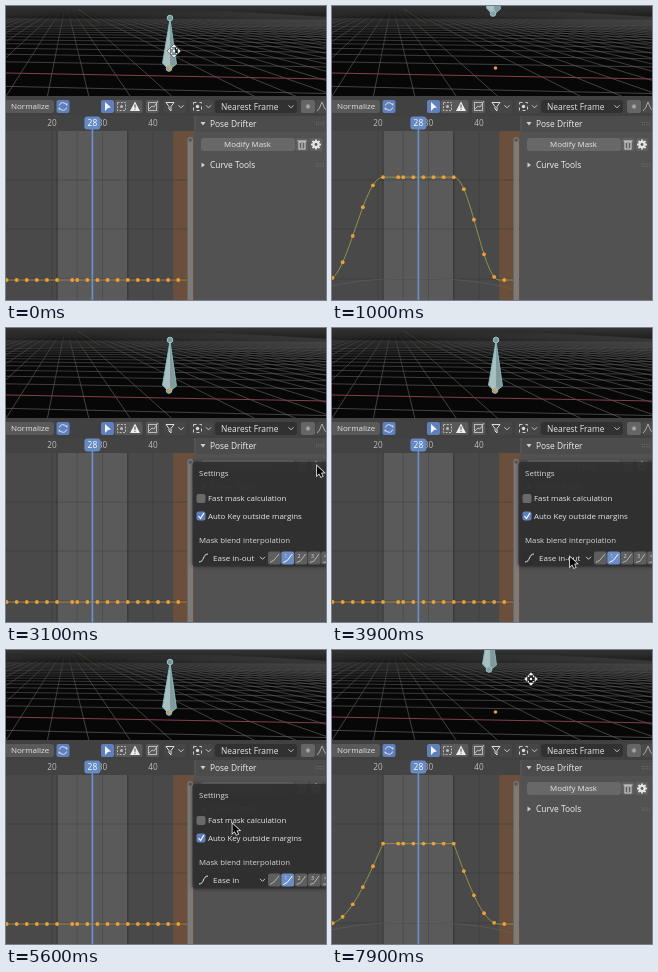
These frames come from a looping animation (320x294 px, 8000 ms). An HTML page with a canvas:

```html
<!DOCTYPE html>
<html lang="en">
<head>
<meta charset="utf-8">
<title>Offset mask</title>
<style>
html, body { margin: 0; width: 100%; height: 100%; overflow: hidden; background: #424242; }
canvas { display: block; width: 320px; height: 294px; }
</style>
</head>
<body>
<canvas id="stage"></canvas>
<script>
const W = 320, H = 294, LOOP = 8000, STEP = 100;
const BASE = 274, GAIN = 1.87;
const BLUE = '#5f80bc', TEXT = '#e6e6e6', ORANGE = '#eda035';
const canvas = document.getElementById('stage');
const g = canvas.getContext('2d');
const dpr = window.devicePixelRatio || 1;
canvas.width = W * dpr;
canvas.height = H * dpr;

const frameX = f => 46 + (f - 20) * 5.05;
const keys = [11, 13, 15, 17, 19, 21, 24, 25, 27, 29, 31, 33, 35, 37, 39, 41, 43, 45];

// Tracks are lists of [time, x, y], joined by straight moves.
const firstDrag = [[0, 0, 0], [500, -1, -27], [1000, -2, -55], [1300, -2, -60]];
const secondDrag = [[7000, 0, 0], [7400, -3, -19], [7900, -6, -43]];
const pointer = [
  [1700, 168, 8], [2000, 250, 78], [2100, 250, 78], [2200, 272, 94], [2900, 311, 138],
  [3100, 311, 138], [3900, 238, 229], [4000, 238, 231], [4200, 240, 237],
  [4300, 240, 237], [4600, 242.5, 246], [4800, 241, 246], [5300, 240, 245],
  [5700, 222, 150], [6100, 205, 72]
];

function along(track, t) {
  if (t <= track[0][0]) return track[0].slice(1);
  for (let i = 1; i < track.length; i++) {
    const [t0, x0, y0] = track[i - 1], [t1, x1, y1] = track[i];
    if (t <= t1) {
      const k = (t - t0) / (t1 - t0);
      return [x0 + (x1 - x0) * k, y0 + (y1 - y0) * k];
    }
  }
  return track[track.length - 1].slice(1);
}

function rect(x, y, w, h, fill, r = 0) {
  g.fillStyle = fill;
  g.beginPath();
  g.roundRect(x, y, w, h, r);
  g.fill();
}

function line(points, color, width = 1) {
  g.strokeStyle = color;
  g.lineWidth = width;
  g.beginPath();
  points.forEach(([x, y], i) => i ? g.lineTo(x, y) : g.moveTo(x, y));
  g.stroke();
}

function poly(points, fill) {
  g.fillStyle = fill;
  g.beginPath();
  points.forEach(([x, y]) => g.lineTo(x, y));
  g.fill();
}

function dot(x, y, r, fill, stroke) {
  g.beginPath();
  g.arc(x, y, r, 0, Math.PI * 2);
  g.fillStyle = fill;
  g.fill();
  if (stroke) {
    g.strokeStyle = stroke;
    g.lineWidth = 1;
    g.stroke();
  }
}

function label(str, x, y, size = 8, color = TEXT, align = 'left') {
  g.font = `${size}px "Open Sans", "Noto Sans", sans-serif`;
  g.textAlign = align;
  g.textBaseline = 'alphabetic';
  g.fillStyle = color;
  g.fillText(str, x, y + size * 0.36);
}

function chevron(x, y) {
  line([[x - 2.5, y - 1.2], [x, y + 1.3], [x + 2.5, y - 1.2]], '#c8c8c8');
}

function easeIcon(x, y, color = TEXT) {
  g.strokeStyle = color;
  g.lineWidth = 1;
  g.beginPath();
  g.moveTo(x - 4.5, y + 4);
  g.bezierCurveTo(x + 1, y + 4, x - 1, y - 4, x + 4.5, y - 4);
  g.stroke();
}

function drawGrid() {
  rect(0, 0, W, 91, '#070707');
  g.save();
  g.beginPath();
  g.rect(0, 0, W, 91);
  g.clip();
  const haze = g.createLinearGradient(0, 0, 0, 24);
  haze.addColorStop(0, '#343434');
  haze.addColorStop(0.4, '#202020');
  haze.addColorStop(1, 'rgba(7,7,7,0)');
  rect(0, 0, W, 24, haze);
  const fade = g.createLinearGradient(0, 4, 0, 70);
  fade.addColorStop(0, 'rgba(90,90,90,0)');
  fade.addColorStop(0.25, 'rgba(95,95,95,.6)');
  fade.addColorStop(1, 'rgba(100,100,100,.8)');
  const vx = 60, vy = -4;
  for (let n = -36; n <= 36; n++) {
    if (n === 0) continue;
    const end = 163 + n * 29;
    line([[vx, vy], [vx + (end - vx) * 1.6, vy + 66 * 1.6]], fade, 0.8);
  }
  for (let n = -1; n < 20; n++) {
    if (n === 0) continue;
    const y = vy + 73 / (1 + n * 0.17), tilt = 3 * (y - vy) / 73;
    line([[0, y - tilt], [W, y + tilt]], fade, 0.8);
  }
  line([[vx + 12, 3], [vx + 34, 17.5]], 'rgba(80,110,50,.5)', 0.8);
  line([[0, 67], [W, 73]], '#80404a', 1);
  g.restore();
}

function drawBone(dx, dy) {
  g.save();
  g.beginPath();
  g.rect(0, 0, W, 91);
  g.clip();
  g.translate(dx, dy);
  const tip = [164, 13], low = [163, 64], left = [156.5, 57], right = [170.5, 58], mid = [164.5, 60];
  poly([tip, left, low, mid], '#a9bfc0');
  poly([tip, right, low, mid], '#839a9c');
  line([tip, left, low, right, tip], '#7fc0c6', 0.9);
  line([tip, mid], '#9bb5b6', 0.6);
  dot(164, 12, 2.8, '#7d9496', '#8fc9ce');
  dot(163, 62.5, 2.8, '#8ba0a2', '#8fc9ce');
  g.restore();
  dot(163.5, 62, 1.8, '#eb9648');
}

function drawHeader() {
  rect(0, 90, W, 20, '#414141');
  rect(-5, 94, 53, 13, '#595959', 3);
  label('Normalize', 5, 100.5);
  rect(50.5, 94, 13, 13, BLUE, 2);
  g.strokeStyle = '#dde4f0';
  g.lineWidth = 1;
  for (const a of [0.3, 3.44]) {
    g.beginPath();
    g.arc(57, 100.5, 3.7, a, a + 2.3);
    g.stroke();
  }
  poly([[59, 97.5], [61.5, 97.5], [61.2, 100]], '#dde4f0');
  poly([[55, 103.5], [52.5, 103.5], [52.8, 101]], '#dde4f0');

  rect(95, 94, 13, 13, BLUE, 2);
  poly([[99, 96], [105, 101.5], [102, 102], [99, 105]], '#f2f2f2');
  rect(108.5, 94, 28, 13, '#595959', 2);
  g.setLineDash([2, 1.3]);
  g.strokeStyle = '#bbb';
  g.strokeRect(111.5, 96.5, 8, 8);
  g.setLineDash([]);
  dot(115.5, 100.5, 1.5, '#bbb');
  poly([[129, 95.5], [134, 105], [124, 105]], '#eeeeee');
  rect(128.5, 98.5, 1, 3.3, '#444');
  rect(128.5, 102.8, 1, 1, '#444');
  rect(140, 94, 13, 13, '#595959', 2);
  g.strokeStyle = '#bbb';
  g.strokeRect(142.5, 96.5, 8, 8);
  line([[143, 103], [146, 100], [148, 101], [152, 95]], '#bbb');
  rect(158, 94, 22, 13, '#464646', 2);
  g.strokeStyle = '#ddd';
  g.beginPath();
  g.moveTo(160, 96.5);
  g.lineTo(168, 96.5);
  g.lineTo(165, 100.5);
  g.lineTo(165, 105);
  g.lineTo(163, 103);
  g.lineTo(163, 100.5);
  g.closePath();
  g.stroke();
  chevron(175, 100.5);
  rect(184, 94, 23, 13, '#464646', 2);
  g.setLineDash([3, 3]);
  g.strokeStyle = '#ccc';
  g.strokeRect(187.5, 96.5, 8, 8);
  g.setLineDash([]);
  dot(191.5, 100.5, 1.7, '#ddd');
  chevron(202.5, 100.5);
  rect(209, 94, 82, 13, '#313131', 3);
  label('Nearest Frame', 215, 100.5, 8.4);
  chevron(285, 100.5);
  rect(295, 94, 14, 13, '#656565', 2);
  dot(302, 100.5, 2, '#aaa', '#888');
  rect(309.5, 94, 12, 13, '#4a4a4a', 2);
  line([[311, 105], [313.5, 102], [316, 96], [318.5, 102], [321, 105]], '#aaa');
}

function mask(f, ease) {
  const t = f < 21 ? (f - 10) / 11 : f > 35 ? (44 - f) / 9 : 1;
  return ease(Math.max(0, Math.min(1, t)));
}
const easeInOut = t => (1 - Math.cos(Math.PI * t)) / 2;
const easeIn = t => 1 - Math.cos(Math.PI * t / 2);

function drawGraph(dy, ease) {
  rect(0, 109, 188, 185, '#494949');
  const a = frameX(21), b = frameX(35);
  rect(a, 125, b - a, 169, '#5a5a5a');
  rect(frameX(44), 125, 21, 169, '#694f3c');
  for (const f of [20, 25, 30, 35, 40]) line([[frameX(f), 125], [frameX(f), H]], 'rgba(45,45,45,.25)');
  for (const y of [174, 223, 273]) line([[0, y], [188, y]], 'rgba(45,45,45,.3)');
  line([[a, 125], [a, H]], '#363636');
  line([[b, 125], [b, H]], '#363636');
  rect(0, 109, 188, 16, '#434343');
  for (const f of [20, 30, 40]) label(String(f), frameX(f), 117, 8.2, '#bdbdbd', 'center');

  const valueY = f => BASE + dy * GAIN * mask(f, ease);
  if (dy) {
    g.strokeStyle = 'rgba(115,105,100,.55)';
    g.lineWidth = 0.8;
    g.beginPath();
    g.moveTo(0, 280);
    g.bezierCurveTo(45, 269, 130, 269, 181, 283);
    g.stroke();
  }
  const curve = [];
  for (let f = 10; f <= 46.8; f += 0.25) curve.push([frameX(f), valueY(f)]);
  line(curve, dy ? '#93934c' : '#a8813e', 1);
  for (const f of keys) dot(frameX(f), valueY(f), 1.9, ORANGE);

  const px = frameX(28);
  line([[px, 122], [px, H]], '#6a8fca', 1.7);
  rect(px - 8, 110.5, 16, 13, '#668ac4', 3);
  label('28', px, 117, 8.4, '#fff', 'center');
  rect(181.5, 131, 5.5, 170, '#7b7b7b', 2.7);
  dot(184.2, 134, 1.8, '#555');
}

function triangle(x, y, open) {
  poly(open ? [[x - 2.5, y - 1.5], [x + 2.5, y - 1.5], [x, y + 2]]
            : [[x - 1.5, y - 2.5], [x + 2, y], [x - 1.5, y + 2.5]], '#d0d0d0');
}

function panelTitle(str, y, open) {
  triangle(197, y, open);
  label(str, 204, y, 8.4, '#f0f0f0');
  for (let i = 0; i < 8; i++) rect(310 + (i % 4) * 2.3, y - 1.5 + (i >> 2) * 2.3, 1, 1, '#707070');
}

function drawSidebar() {
  rect(188, 109, 132, 185, '#525252');
  rect(190, 110, 130, 16, '#4c4c4c');
  panelTitle('Pose Drifter', 117.5, true);
  rect(195, 132, 94, 13, '#686868', 3);
  label('Modify Mask', 241.5, 138.5, 7.9, TEXT, 'center');
  rect(289.5, 132, 13, 13, '#5f5f5f', 2);
  g.strokeStyle = '#ddd';
  g.lineWidth = 1;
  g.strokeRect(293, 136, 6, 7);
  line([[291.5, 135], [300.5, 135]], '#ddd');
  line([[296, 137], [296, 142]], '#ddd');
  rect(303.5, 132, 13, 13, '#5f5f5f', 2);
  for (let i = 0; i < 4; i++) {
    const c = Math.cos(i * Math.PI / 4) * 5, s = Math.sin(i * Math.PI / 4) * 5;
    line([[310 - c, 138.5 - s], [310 + c, 138.5 + s]], '#e6e6e6', 1.8);
  }
  dot(310, 138.5, 3.7, '#e6e6e6');
  dot(310, 138.5, 1.4, '#5c5c5c');
  panelTitle('Curve Tools', 159, false);
}

function checkbox(y, on, str) {
  rect(190.5, y - 4.5, 9, 9, on ? BLUE : '#6a6a6a', 2);
  if (on) line([[192.5, y], [194.5, y + 2.5], [198, y - 3]], '#fff', 1.2);
  label(str, 202, y, 7.9);
}

function drawPopup(menu, choice) {
  g.save();
  g.shadowColor = 'rgba(0,0,0,.5)';
  g.shadowBlur = 4;
  rect(186.5, 134, 140, 104.5, 'rgba(49,49,49,.93)', 3);
  g.restore();
  label('Settings', 193, 145.5, 8, '#d8d8d8');
  checkbox(170.5, false, 'Fast mask calculation');
  checkbox(188, true, 'Auto Key outside margins');
  label('Mask blend interpolation', 193, 212.5, 7.8, '#d8d8d8');
  rect(190.5, 223.5, 71, 13, menu ? '#747679' : '#2f2f2f', 3);
  easeIcon(197.5, 230);
  label(choice, 207, 230, 8);
  chevron(256.5, 230);
  for (let i = 0; i < 5; i++) {
    const x = 262 + i * 13.3;
    rect(x, 223.5, 12.8, 13, i === 1 ? '#6c8cc6' : '#5e5e5e', 2);
    line([[x + 2, 234.5], [x + 6, 232 + i * 0.4], [x + 11, 226]], i === 1 ? '#fff' : '#b5b5b5');
    if (i) label(String(i), x + 3, 228, 5.5, '#ddd');
  }
}

function drawMenu(hover) {
  g.save();
  g.shadowColor = 'rgba(0,0,0,.6)';
  g.shadowBlur = 4;
  rect(180.5, 237.5, 82, 70, '#282828');
  g.restore();
  ['Ease in', 'Ease in-out', 'Ease-out'].forEach((name, i) => {
    const y = 245 + i * 15.5;
    if (i === hover) rect(180.5, y - 7, 82, 14, BLUE);
    easeIcon(192, y);
    label(name, 201, y, 8, i === hover ? '#fff' : TEXT);
  });
  line([[182, 286.5], [261, 286.5]], '#3a3a3a');
  label('Interpolation', 186, 296, 8, '#777');
}

function drawArrow(x, y) {
  const shape = [[0, 0], [0, 9.5], [2.2, 7.5], [4, 11], [5.6, 10.2], [4, 6.8], [7, 6.6]];
  const points = shape.map(([a, b]) => [x + a, y + b]);
  line([...points, points[0], points[1]], '#e8e8e8', 1.6);
  poly(points, '#080808');
}

function drawCross(x, y) {
  for (const [color, width] of [['#111', 2], ['#eee', 1]]) {
    line([[x - 6, y], [x - 2, y]], color, width);
    line([[x + 2, y], [x + 6, y]], color, width);
    line([[x, y - 6], [x, y - 2]], color, width);
    line([[x, y + 2], [x, y + 6]], color, width);
  }
}

function drawMove(x, y) {
  for (let i = 0; i < 4; i++) {
    g.save();
    g.translate(x, y);
    g.rotate(i * Math.PI / 2);
    poly([[0, -7], [3.2, -3.6], [-3.2, -3.6]], '#f4f4f4');
    line([[0, -7], [3.2, -3.6], [-3.2, -3.6], [0, -7]], '#222', 0.5);
    rect(2, -3.2, 1.5, 1.5, '#f4f4f4');
    g.restore();
  }
  dot(x, y, 1.2, '#f4f4f4');
}

function draw(time) {
  const t = Math.floor(time % LOOP / STEP) * STEP;
  const first = t < 1700, second = t >= 7000;
  const [dx, dy] = first ? along(firstDrag, t) : second ? along(secondDrag, t) : [0, 0];
  g.setTransform(dpr, 0, 0, dpr, 0, 0);
  drawGrid();
  drawBone(dx, dy);
  drawGraph(dy, second ? easeIn : easeInOut);
  drawSidebar();
  drawHeader();

  const [px, py] = along(pointer, t);
  const menu = t >= 4000 && t < 5000;
  if (t >= 3100 && t < 5700) drawPopup(menu, t >= 5000 ? 'Ease in' : 'Ease in-out');
  if (menu) drawMenu(py > 238 ? 0 : 1);

  if (first) drawMove(168 + dx, 45 + dy);
  else if (second) drawMove(205 + dx, 72 + dy);
  else if (py < 90) drawCross(px, py);
  else drawArrow(px, py);
}

const start = performance.now();
function tick() {
  draw(performance.now() - start);
  requestAnimationFrame(tick);
}
tick();
</script>
</body>
</html>
```
